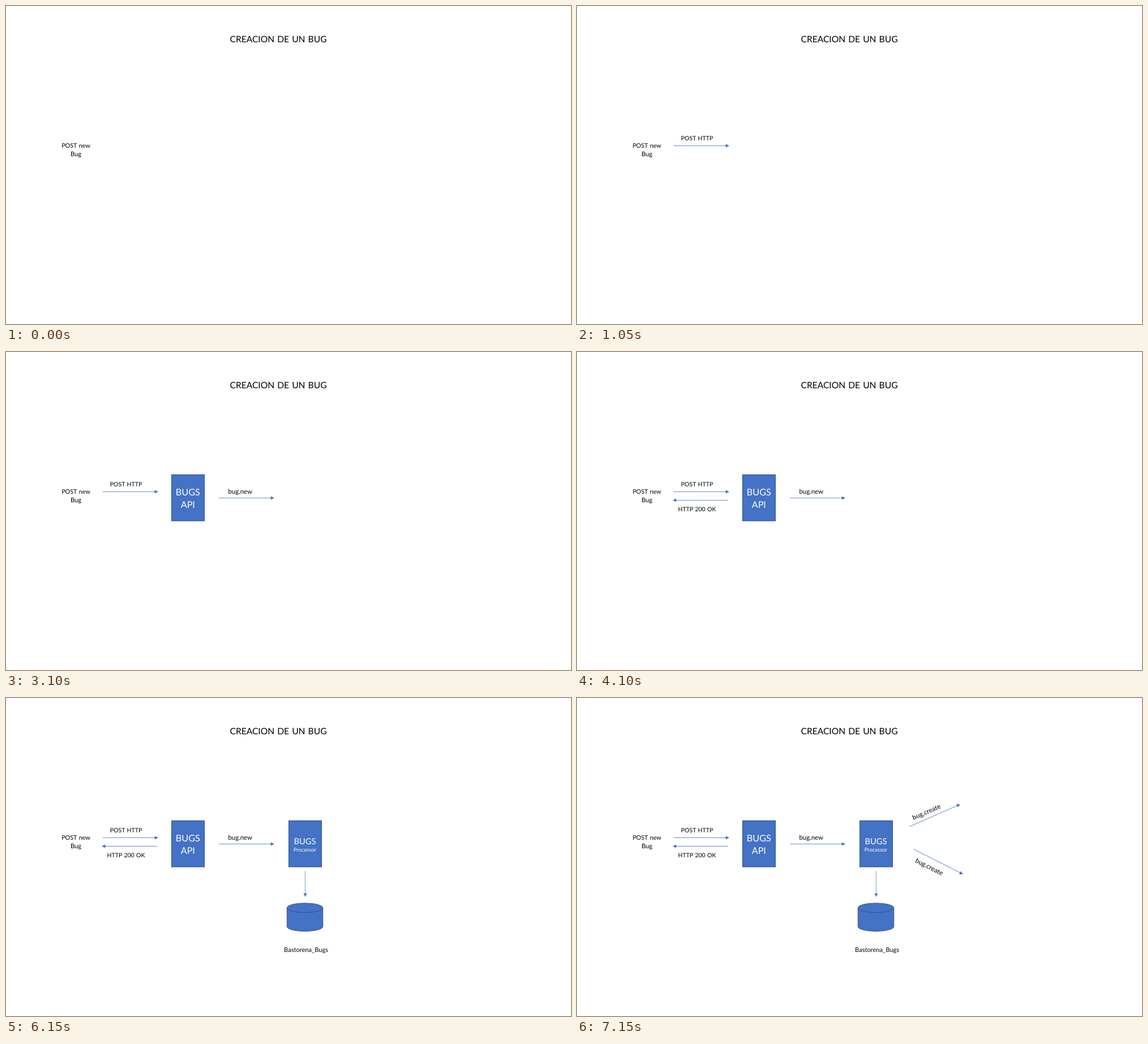
These frames come from a looping animation (998x561 px, 8000 ms). An HTML page:

```html
<!DOCTYPE html>
<html lang="es">
<head>
<meta charset="utf-8">
<title>Creacion de un bug</title>
<style>
  html, body { margin: 0; width: 100%; height: 100%; overflow: hidden; background: #fff; }
  svg { display: block; width: 998px; height: 561px; }
  text {
    font-family: Lato, "Open Sans", sans-serif;
    text-anchor: middle;
    text-rendering: geometricPrecision;
    word-spacing: 0.07em;
    fill: #000;
  }
  .shape { fill: #4472c4; stroke: #2f528f; stroke-width: 1; }
  .line { stroke: #4472c4; stroke-width: 0.8; }
  .head { fill: #4472c4; }
  .light { fill: #fff; }
</style>
</head>
<body>
<svg id="stage" viewBox="0 0 998 561"></svg>
<script>
const LOOP = 8000;

const label = (text, x, y, size, { angle = 0, cls = "" } = {}) =>
  `<text class="${cls}" font-size="${size}" transform="translate(${x} ${y}) rotate(${angle})">${text}</text>`;

const arrow = (x1, y1, x2, y2) => {
  const length = Math.hypot(x2 - x1, y2 - y1);
  const angle = Math.atan2(y2 - y1, x2 - x1) * 180 / Math.PI;
  return `<g transform="translate(${x1} ${y1}) rotate(${angle})">
    <path class="line" d="M0 0H${length - 5}"/>
    <path class="head" d="M${length} 0l-6.3 -3.1v6.2z"/></g>`;
};

const box = x => `<rect class="shape" x="${x}" y="216.5" width="58" height="81.5"/>`;

const cylinder = (x, y, rx, ry, height) => `<g class="shape">
  <path d="M${x - rx} ${y}v${height}a${rx} ${ry} 0 0 0 ${2 * rx} 0v${-height}"/>
  <ellipse cx="${x}" cy="${y}" rx="${rx}" ry="${ry}"/></g>`;

const light = { cls: "light" };

// Each step appears at its time and stays until the loop restarts.
const steps = [
  [0, label("CREACION DE UN BUG", 481, 64, 15.6)
    + label("POST new", 123.5, 250, 10.8)
    + label("Bug", 123.5, 265, 11.2)],
  [1050, arrow(171, 246.5, 269, 246.5) + label("POST HTTP", 212, 237, 10.5)],
  [2050, box(292.5)
    + label("BUGS", 321.3, 252.5, 16.2, light)
    + label("API", 321.3, 275, 16.2, light)],
  [3100, arrow(376, 257.5, 474, 257.5) + label("bug.new", 413.7, 250, 11.4)],
  [4100, arrow(267, 261.5, 169, 261.5) + label("HTTP 200 OK", 212, 281, 10.5)],
  [5100, box(499.5)
    + label("BUGS", 528, 257.5, 14.7, light)
    + label("Processor", 527.8, 271, 9.4, light)
    + cylinder(528, 370.2, 31.7, 8.3, 33)
    + label("Bastorena_Bugs", 530, 448, 11.1)],
  [6150, arrow(528.5, 305, 528.5, 351)],
  [7150, arrow(587, 227, 677, 187.5)
    + label("bug.create", 619, 204.5, 11.6, { angle: -23.7 })
    + arrow(594.5, 266.5, 682, 311)
    + label("bug.create", 620.5, 301.3, 11.6, { angle: 27 })]
];

const stage = document.getElementById("stage");
stage.innerHTML = steps.map(([, art]) => `<g>${art}</g>`).join("");

steps.forEach(([time], i) => {
  if (!time) return;
  const offset = time / LOOP;
  stage.children[i].animate([
    { opacity: 0, offset: 0 },
    { opacity: 0, offset },
    { opacity: 1, offset },
    { opacity: 1, offset: 1 }
  ], { duration: LOOP, iterations: Infinity });
});
</script>
</body>
</html>
```
